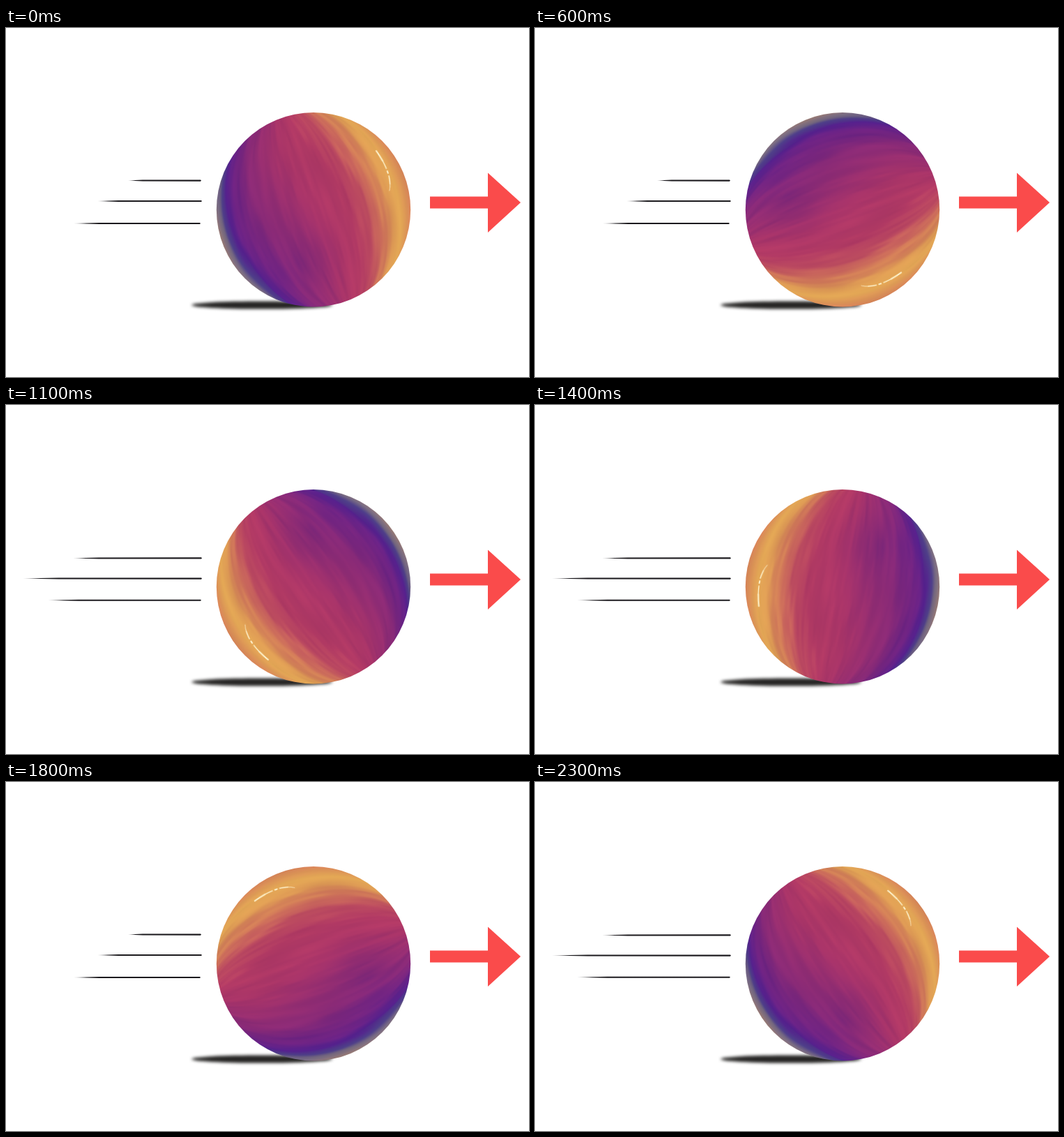
These frames come from a looping animation (750x500 px, 2400 ms). An HTML page with a canvas:

```html
<!DOCTYPE html>
<html lang="en">
<head>
<meta charset="utf-8">
<title>Rolling ball</title>
<style>
html, body { margin: 0; width: 100%; height: 100%; overflow: hidden; background: #fff; }
canvas { display: block; width: 750px; height: 500px; }
</style>
</head>
<body>
<canvas id="stage" width="750" height="500"></canvas>
<script>
const ctx = document.getElementById('stage').getContext('2d');
const BALL = { x: 441, y: 260.3, r: 139.2 };
const STEP = 100, STEPS = 24, START = -29;
const TILT = 10 * Math.PI / 180;

// Paint colours from the shaded rim (-1) to the lit rim (1)
const RAMP = [
  [-1.02, '#a08078'], [-0.965, '#776a82'], [-0.925, '#4f3f8a'], [-0.86, '#54208c'],
  [-0.76, '#6e2383'], [-0.58, '#862978'], [-0.28, '#9a2f70'], [0, '#a83468'],
  [0.3, '#b23a64'], [0.48, '#bd4c60'], [0.63, '#cd705a'], [0.77, '#db9754'],
  [0.88, '#e0a554'], [1.02, '#d67c5a']
].map(([at, hex]) => [at, [1, 3, 5].map(i => parseInt(hex.slice(i, i + 2), 16))]);

// Speed lines: [left, right, y]
const LINES = [
  [[175, 280, 218.6], [131, 281, 248], [97, 279, 280]],
  [[135, 280, 219], [77, 281, 248.3], [79, 280, 280]],
  [[96, 281, 219.4], [24, 281, 248.6], [60, 280, 279.8]]
];

// Points along the glint, relative to the ball centre
const GLINT = [[119.5, -30], [120.6, -13], [119.4, 3], [117.2, 13.5], [108.5, 29]];

function ramp(s) {
  s = Math.max(-1.02, Math.min(1.02, s));
  let i = 1;
  while (i < RAMP.length - 1 && RAMP[i][0] < s) i++;
  const [a, from] = RAMP[i - 1], [b, to] = RAMP[i];
  const t = (s - a) / (b - a);
  return from.map((c, k) => c + (to[k] - c) * t);
}

function hash(x, y) {
  const v = Math.sin(x * 127.1 + y * 311.7) * 43758.5453;
  return v - Math.floor(v);
}

function noise(x, y) {
  const ix = Math.floor(x), iy = Math.floor(y);
  const ease = t => t * t * (3 - 2 * t);
  const u = ease(x - ix), v = ease(y - iy);
  const top = hash(ix, iy) * (1 - u) + hash(ix + 1, iy) * u;
  const low = hash(ix, iy + 1) * (1 - u) + hash(ix + 1, iy + 1) * u;
  return top * (1 - v) + low * v - 0.5;
}

const bump = (x, y, cx, cy, size) =>
  Math.exp(-((x - cx) ** 2 + (y - cy) ** 2) / size);

// Brush strokes follow meridians between two poles
function paintBall() {
  const size = 288, half = size / 2;
  const skin = document.createElement('canvas');
  skin.width = skin.height = size;
  const c = skin.getContext('2d');
  const image = c.createImageData(size, size);
  for (let py = 0; py < size; py++) {
    for (let px = 0; px < size; px++) {
      let x = (px + 0.5 - half) / BALL.r, y = (py + 0.5 - half) / BALL.r;
      const d = Math.hypot(x, y);
      if (d > 1) { x /= d; y /= d; }
      const u = x * Math.cos(TILT) + y * Math.sin(TILT);
      const v = y * Math.cos(TILT) - x * Math.sin(TILT);
      let s = u / Math.sqrt(1 - 0.8 * v * v);
      const calm = Math.max(0.15, 1 - s * s);
      const streak = noise(s * 14 + 40, v * 2.2 + 9) + 0.6 * noise(s * 36 + 80, v * 4 + 30);
      s += 0.16 * calm * streak;
      s -= 0.22 * bump(x, y, -0.3, 0.42, 0.18);
      s += 0.16 * bump(x, y, 0.02, -0.7, 0.15);
      const rgb = ramp(s);
      const light = 1 + 0.05 * streak;
      const i = (py * size + px) * 4;
      rgb.forEach((value, k) => { image.data[i + k] = value * light; });
      image.data[i + 3] = 255;
    }
  }
  c.putImageData(image, 0, 0);
  c.translate(half, half);
  drawGlint(c);
  return skin;
}

function drawGlint(c) {
  const [a, b, m, n, z] = GLINT;
  c.strokeStyle = '#fff5d2';
  c.lineCap = 'round';
  const arc = (from, by, to, width) => {
    c.lineWidth = width;
    c.beginPath();
    c.moveTo(...from);
    c.quadraticCurveTo(...by, ...to);
    c.stroke();
  };
  arc(a, [120.6, -22], b, 1.9);
  arc(b, [120.6, -6], [119.9, -1], 1.3);
  arc(m, [119, 5], [118.8, 6], 1.9);
  arc([118, 10], n, [113.8, 21], 1.4);
  arc([113.8, 21], [112, 25], z, 0.9);
}

function drawShadow() {
  ctx.save();
  ctx.filter = 'blur(2px)';
  ctx.fillStyle = '#262524';
  ctx.beginPath();
  ctx.ellipse(367, 397, 101, 5.6, 0, 0, Math.PI * 2);
  ctx.fill();
  ctx.restore();
}

function drawLine([left, right, y]) {
  const body = left + (right - left) * 0.2;
  const fade = ctx.createLinearGradient(left, 0, body, 0);
  fade.addColorStop(0, 'rgba(28,26,30,0.35)');
  fade.addColorStop(0.5, '#1c1a1e');
  ctx.fillStyle = fade;
  ctx.beginPath();
  ctx.moveTo(left, y);
  ctx.lineTo(body, y - 1);
  ctx.lineTo(right - 1, y - 1.05);
  ctx.lineTo(right, y);
  ctx.lineTo(right - 1, y + 1.05);
  ctx.lineTo(body, y + 1);
  ctx.fill();
}

function drawArrow() {
  ctx.fillStyle = '#fa4b4b';
  ctx.fillRect(608, 241.5, 84, 17);
  ctx.beginPath();
  ctx.moveTo(691, 207.5);
  ctx.lineTo(738, 250);
  ctx.lineTo(691, 293);
  ctx.fill();
}

function drawBall(step) {
  ctx.save();
  ctx.translate(BALL.x, BALL.y);
  ctx.beginPath();
  ctx.arc(0, 0, BALL.r, 0, Math.PI * 2);
  ctx.clip();
  ctx.rotate((START + step * 360 / STEPS) * Math.PI / 180);
  ctx.drawImage(skin, -skin.width / 2, -skin.height / 2);
  ctx.restore();
}

function draw(step) {
  ctx.fillStyle = '#fff';
  ctx.fillRect(0, 0, 750, 500);
  drawShadow();
  LINES[step % LINES.length].forEach(drawLine);
  drawArrow();
  drawBall(step);
}

const skin = paintBall();
const begin = performance.now();
let shown = -1;

function tick() {
  const step = Math.floor((performance.now() - begin) / STEP) % STEPS;
  if (step !== shown) draw(shown = step);
  requestAnimationFrame(tick);
}
tick();
</script>
</body>
</html>
```
